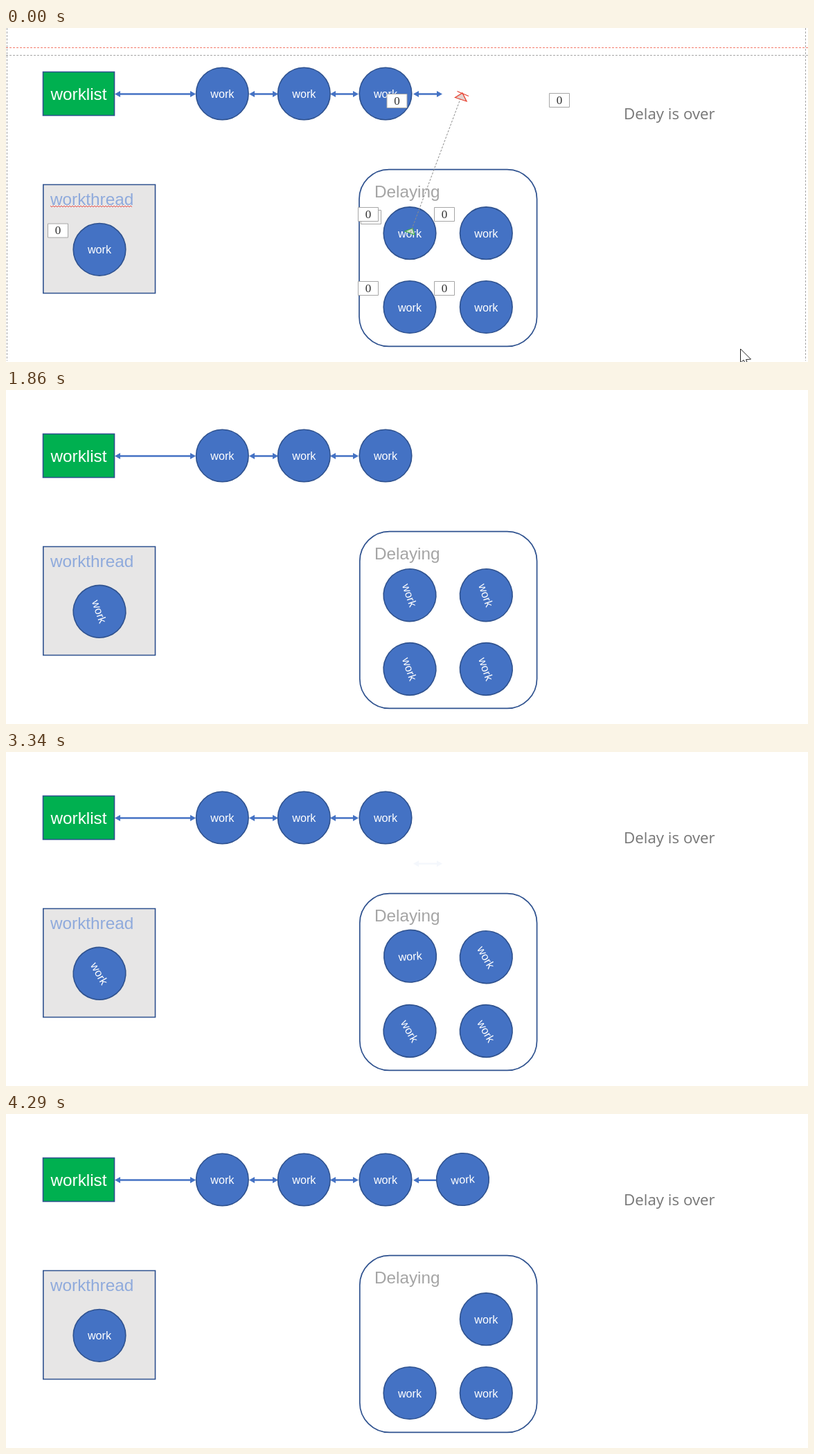
An HTML page with a canvas for the animation above (4.74 s loop, 1158 px wide and 483 px high).

```html
<!DOCTYPE html>
<html lang="en">
<head>
<meta charset="utf-8">
<title>Delayed work</title>
<style>
  html, body { margin: 0; height: 100%; overflow: hidden; background: #fff; }
  canvas { display: block; }
</style>
</head>
<body>
<canvas id="stage" width="1158" height="483"></canvas>
<script>
const ctx = document.getElementById('stage').getContext('2d');
const LOOP = 4740, SHOW_START = 1235, TICK = 78.2, TICK_START = 1226;
const SPIN = { start: 1253, turn: 500, turns: 6 };
const FLOAT = { distance: 70, duration: 1000 };
const TEXT_IN = 2275, MOVE_START = 3280, MOVE_TIME = 940;
const BLUE = '#4472c4', EDGE = '#2f528f', SANS = '"Liberation Sans", Arial, sans-serif';

const clamp = x => Math.max(0, Math.min(1, x));
const easeInOut = p => p < .5 ? 2 * p * p : 1 - 2 * (1 - p) ** 2;

function paint(fill, stroke, width = 1) {
  if (fill) { ctx.fillStyle = fill; ctx.fill(); }
  if (stroke) { ctx.strokeStyle = stroke; ctx.lineWidth = width; ctx.stroke(); }
}

function box(x, y, w, h, fill, stroke, width, radius = 0) {
  ctx.beginPath();
  ctx.roundRect(x, y, w, h, radius);
  paint(fill, stroke, width);
}

function poly(points, fill, stroke, width, closed = true) {
  ctx.beginPath();
  points.forEach(([x, y]) => ctx.lineTo(x, y));
  if (closed) ctx.closePath();
  paint(fill, stroke, width);
}

function label(text, x, y, size, color, family = SANS, align = 'left') {
  ctx.font = `${size}px ${family}`;
  ctx.textAlign = align;
  ctx.fillStyle = color;
  ctx.fillText(text, x, y);
}

function ball(x, y, angle = 0) {
  ctx.save();
  ctx.translate(x, y);
  ctx.rotate(angle * Math.PI / 180);
  ctx.beginPath();
  ctx.arc(0, 0, 37.8, 0, 2 * Math.PI);
  paint(BLUE, EDGE, 1.6);
  label('work', 0, 6, 16.2, '#fff', SANS, 'center');
  ctx.restore();
}

function arrow(x1, x2, y = 95.5) {
  const half = [[x1, y], [x1 + 8, y - 4.5], [x1 + 8, y - 1.3], [x2 - 8, y - 1.3], [x2 - 8, y - 4.5], [x2, y]];
  const mirrored = half.slice(1, -1).reverse().map(([x, v]) => [x, 2 * y - v]);
  poly([...half, ...mirrored], BLUE);
}

function dashed(x1, y1, x2, y2, color) {
  ctx.setLineDash([3, 2]);
  poly([[x1, y1], [x2, y2]], null, color, 1, false);
  ctx.setLineDash([]);
}

function tag(x, y, text = '0') {
  box(x - 14.5, y - 10, 29, 20, '#fff', '#a6a6a6');
  label(text, x, y + 5, 17, '#333', '"Liberation Serif", serif', 'center');
}

// Float-in entrance: fades while rising to its place.
function floatIn(time, start, draw) {
  const p = clamp((time - start) / FLOAT.duration);
  if (!p) return;
  ctx.save();
  ctx.globalAlpha = p;
  ctx.translate(0, FLOAT.distance * (1 - p));
  draw();
  ctx.restore();
}

const lastArrow = () => arrow(588, 630);
const message = () => label('Delay is over', 892, 132, 22.3, '#767676', '"Open Sans", "Noto Sans", sans-serif');

function drawDiagram(panelX) {
  box(53.5, 63.5, 103, 63, '#00b050', EDGE, 1.6);
  label('worklist', 64.5, 104, 24.3, '#fff');
  arrow(157, 274);
  arrow(351, 393);
  arrow(468, 509);
  [312.3, 430.3, 548].forEach(x => ball(x, 95));
  box(53.8, 226.5, 161.7, 157, '#e7e6e6', EDGE, 1.6);
  label('workthread', 64, 255.5, 24.3, '#8faadc');
  box(panelX, 204.6, 766.6 - panelX, 255.8, '#fff', EDGE, 1.7, 43);
  label('Delaying', 532, 245, 24.3, '#a5a5a5');
}

function waitingBalls(angle) {
  ball(135, 320.3, angle);
  [[693.3, 296.7], [583, 403.5], [693.3, 403.5]].forEach(([x, y]) => ball(x, y, angle));
}

function drawEditor(time) {
  dashed(1.5, 0, 1.5, 481, '#a6a6a6');
  dashed(1154.5, 0, 1154.5, 481, '#a6a6a6');
  dashed(0, 28.5, 1158, 28.5, '#f47c6c');
  dashed(0, 39.5, 1158, 39.5, '#a6a6a6');
  drawDiagram(510);

  const squiggle = [];
  for (let x = 64; x <= 183; x += 2) squiggle.push([x, 257 + (x / 2 % 2) * 2]);
  poly(squiggle, null, '#e8403a', .9, false);

  waitingBalls(0);
  ball(583, 296.7);
  lastArrow();
  message();

  poly([[576, 294], [590, 299], [587, 289.5]], '#d5ddd0', '#3fae49', 1.2);
  dashed(584, 296, 657, 100, '#8c8c8c');
  poly([[648.5, 100.5], [665, 106], [659, 94]], '#e3d3cf', '#e8402f', 1.3);
  poly([[651.5, 91.5], [668, 98.5]], null, '#e8402f', 1.3, false);

  [[564.5, 105.5], [799, 104.5], [527, 273.5], [523, 269.5], [633, 269.5],
   [523, 376.5], [633, 376.5], [75, 293]].forEach(([x, y], i) => tag(x, y, i === 2 ? '' : '0'));

  if (time < 70) {
    poly([[1060.5, 464], [1060.5, 484], [1065, 480], [1068, 487], [1071, 486], [1068.5, 479.5], [1075.5, 479]],
      '#fff', '#222', 1);
  }
}

function drawShow(time) {
  const now = TICK_START + TICK * Math.floor((time - TICK_START) / TICK);
  const spinAt = t => 360 * Math.max(0, Math.min(SPIN.turns, (t - SPIN.start) / SPIN.turn));
  const moved = easeInOut(clamp((now - MOVE_START) / MOVE_TIME));

  drawDiagram(510.8);
  waitingBalls(spinAt(now));
  floatIn(now, TEXT_IN, message);
  floatIn(now, MOVE_START, lastArrow);
  // The first delayed ball stops just short of a whole turn and leaves.
  ball(583 + 76.5 * moved, 296.7 - 202.2 * moved, now < MOVE_START ? spinAt(now) : -4);
}

function frame() {
  const time = performance.now() % LOOP;
  ctx.fillStyle = '#fff';
  ctx.fillRect(0, 0, 1158, 483);
  (time < SHOW_START ? drawEditor : drawShow)(time);
  requestAnimationFrame(frame);
}
frame();
</script>
</body>
</html>
```
